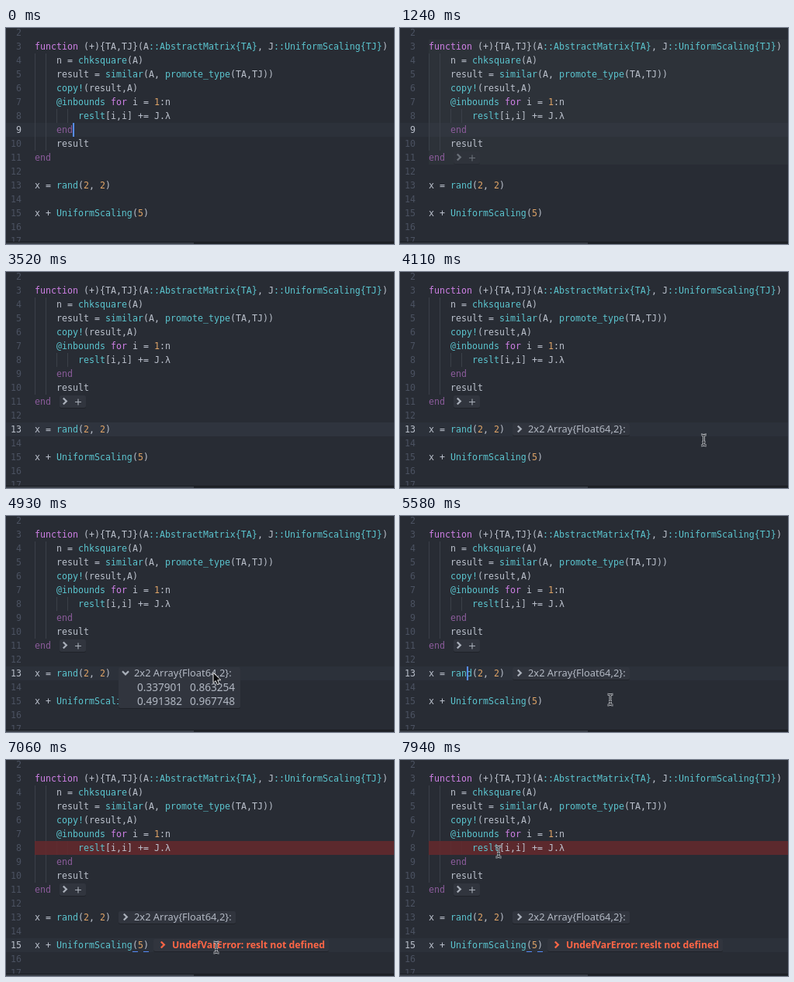
Recreate the animation shown at these times as an HTML page. Size 500 by 280 pixels, loop 8000 ms.

```html
<!DOCTYPE html>
<html lang="en">
<head>
<meta charset="utf-8">
<title>Inline evaluation</title>
<style>
html, body { margin: 0; width: 100%; height: 100%; overflow: hidden; background: #282c34; }
svg { display: block; width: 100vw; height: 100vh; }
text { white-space: pre; }
.code { font: 11.627px "DejaVu Sans Mono", monospace; fill: #bcc2cd; }
.ui { font: 12.87px "Noto Sans", sans-serif; fill: #b2b8c3; }
.row { font-size: 13.6px; }
.err { font-size: 12.28px; font-weight: 700; fill: #ff6646; }
</style>
</head>
<body>
<svg id="stage" viewBox="0 0 500 280"></svg>
<script>
(() => {
const LOOP = 8000, LEFT = 37, CHAR = 7, ROW = 18;
const COLORS = { k: '#cf80e6', e: '#8c5c9c', f: '#5bc5cf', n: '#dfa467' };
const stage = document.getElementById('stage');

function el(tag, attrs = {}, parent = stage, text) {
  const node = document.createElementNS('http://www.w3.org/2000/svg', tag);
  set(node, attrs);
  if (text !== undefined) node.textContent = text;
  parent.appendChild(node);
  return node;
}
function set(node, attrs) { for (const key in attrs) node.setAttribute(key, attrs[key]); }
const show = (node, on) => node.setAttribute('opacity', +on);
const rect = (x, y, width, height, fill, parent, more) =>
  el('rect', { x, y, width, height, fill, ...more }, parent);
const rowTop = line => ROW * line - 39;
const baseline = line => ROW * line - 26;
const clamp = v => Math.max(0, Math.min(1, v));
const ramp = (t, a, b) => clamp((t - a) / (b - a));
const smooth = v => v * v * (3 - 2 * v);
const within = (t, a, b) => t >= a && t < b;

// Markup: <kind:text> colours a token
const code = {
  3: '<k:function> (+){TA,TJ}(A<f:::AbstractMatrix{TA}>, J<f:::UniformScaling{TJ}>)',
  4: '    n = <f:chksquare>(A)',
  5: '    result = <f:similar>(A, <f:promote_type>(TA,TJ))',
  6: '    <f:copy!>(result,A)',
  7: '    <f:@inbounds> <k:for> i = <n:1>:n',
  8: '        <f:reslt>[i,i] += J.λ',
  9: '    <e:end>',
  10: '    result',
  11: '<e:end>',
  13: 'x = <f:rand>(<n:2>, <n:2>)',
  15: 'x + <f:UniformScaling>(<n:5>)'
};

function codeLine(line, markup) {
  let col = 0;
  for (const part of markup.split(/(<[a-z]:[^>]*>)/)) {
    const token = /^<([a-z]):(.*)>$/.exec(part);
    const raw = token ? token[2] : part;
    const body = raw.trimStart();
    const pad = raw.length - body.length;
    if (body) {
      const node = el('text', { class: 'code', x: LEFT + CHAR * (col + pad), y: baseline(line) }, stage, body);
      if (token) node.style.fill = COLORS[token[1]];
    }
    col += raw.length;
  }
}

function chevron(x, y, color, parent) {
  const g = el('g', { transform: `translate(${x} ${y})` }, parent);
  return el('path', {
    d: 'M-2.2-4L1.8 0L-2.2 4', fill: 'none', stroke: color, 'stroke-width': 2.3
  }, g);
}

function panel(x, y, w, h) {
  const g = el('g');
  const shadow = rect(x, y + 1, w, h, '#1c1f25', g, { rx: 2.5, opacity: .75 });
  const face = rect(x, y, w, h, '#31353e', g, { rx: 2.5 });
  return { g, resize(width, height) { for (const r of [shadow, face]) set(r, { width, height }); } };
}

// Backgrounds
rect(0, 0, 500, 280, '#282c34');
const activeRow = rect(0, 0, 500, ROW, '#2c313a');
const flash = rect(LEFT, 0, 463, ROW, '#c3cad8');
const stripes = el('pattern', {
  id: 'stripes', width: 20, height: 20, patternUnits: 'userSpaceOnUse',
  patternTransform: 'translate(0 249) skewX(-45)'
}, el('defs'));
rect(0, 0, 20, 20, '#2c3037', stripes);
rect(0, 0, 10, 20, '#363a41', stripes);
const loading = rect(LEFT, rowTop(15), 463, ROW, 'url(#stripes)');

for (let line = 4; line <= 10; line++)
  for (let i = 0; i < (line === 8 ? 4 : 2); i++)
    rect(LEFT + 14 * i, rowTop(line), 1, ROW, '#3b4049');
const errorRow = rect(LEFT, rowTop(8), 463, ROW, '#63292d', stage, { 'fill-opacity': .88 });

// Text and gutter
const numbers = {};
for (let line = 2; line <= 17; line++) {
  numbers[line] = el('text', { class: 'code', x: 20, y: baseline(line), 'text-anchor': 'end' }, stage, line);
  if (code[line]) codeLine(line, code[line]);
}
const brackets = el('g');
for (const col of [18, 20]) rect(LEFT + CHAR * col, 248, CHAR, 1, '#568cff', brackets);
const caret = rect(0, 0, 2, ROW, '#568cff');

// Results
const badge = panel(69, 160, 34, 16);
chevron(76, 167.5, '#a9afb9', badge.g);
el('path', { d: 'M89 168.5H97M93 164.5V172.5', stroke: '#a9afb9', 'stroke-width': 1.1 }, badge.g);

const failure = panel(190, 232, 226, 16);
chevron(202, 239.5, '#ff6646', failure.g);
el('text', { class: 'ui err', x: 214, y: 244 }, failure.g, 'UndefVarError: reslt not defined');

const matrix = panel(145, 196, 151, 16);
const matrixMark = chevron(154, 203.5, '#a9afb9', matrix.g);
el('text', { class: 'ui', x: 165, y: 208 }, matrix.g, '2x2 Array{Float64,2}:');
const cells = el('g', {}, matrix.g);
[['0.337901', '0.863254'], ['0.491382', '0.967748']].forEach((values, r) =>
  values.forEach((value, c) =>
    el('text', { class: 'ui row', x: 169 + 68 * c, y: 227 + ROW * r }, cells, value)));

// Bottom edge
rect(0, 277, 500, 3, '#20242a');
rect(0, 277, 500, 1, '#191c21');
rect(0, 278, 242, 2, '#3a3f48');

// Mouse pointers
const beam = el('g');
for (const [stroke, width] of [['#c9ccd1', 2.8], ['#25282e', 1.1]])
  el('path', {
    d: 'M-3.5-7Q0-7 0-5Q0-7 3.5-7M0-5V5M-3.5 7Q0 7 0 5Q0 7 3.5 7M-2 2.5H2',
    fill: 'none', stroke, 'stroke-width': width
  }, beam);
const arrow = el('g');
el('path', {
  d: 'M0 0V13.5L3.2 10.6L5.3 15.5L7.8 14.4L5.7 9.7H10Z', fill: '#08090b', stroke: '#e8e8e8', 'stroke-width': 1
}, arrow);

// Caret moves: time, line, column
const moves = [[0, 9, 7], [1660, 10, 7], [2440, 11, 3], [2620, 12, 0], [2800, 13, 7], [5820, 15, 21]];
// Spans in which the caret is lit
const blinks = [[0, 180], [530, 950], [1360, 2140], [2440, 3340], [3700, 4100], [4500, 4900],
  [5300, 5700], [5820, 6230], [6650, 7060], [7480, 7880]];
// Mouse path: time, x, y
const mouse = [[3700, 461, 227], [4110, 392, 218], [4290, 298, 209], [4480, 267, 203], [5250, 267, 203],
  [5580, 271, 238], [5720, 271, 244], [5800, 271, 243], [7480, 271, 243], [7560, 275, 246],
  [7940, 127, 119], [LOOP, 127, 119]];

function mouseAt(t) {
  const i = mouse.findIndex(p => p[0] > t);
  if (i < 1) return null;
  const [a, b] = [mouse[i - 1], mouse[i]];
  const k = ramp(t, a[0], b[0]);
  return [a[1] + (b[1] - a[1]) * k, a[2] + (b[2] - a[2]) * k];
}

function render(t) {
  const [, line, col] = moves.filter(m => m[0] <= t).pop();
  set(activeRow, { y: rowTop(line) });
  for (const n in numbers) numbers[n].style.fill = +n === line ? '#b9bfca' : '#4b5261';
  set(caret, { x: LEFT + CHAR * col, y: rowTop(line) });
  show(caret, blinks.some(([on, off]) => within(t, on, off)));
  show(brackets, line === 15);

  const block = t < 3000;
  const start = block ? 950 : 3520;
  set(flash, { y: rowTop(block ? 3 : 13), height: ROW * (block ? 9 : 1) });
  show(flash, .06 * ramp(t, start - 30, start + 60) * (1 - ramp(t, start + 180, start + 410)));

  show(badge.g, ramp(t, 1120, 1360));
  show(matrix.g, ramp(t, 3560, 3760));
  const open = smooth(ramp(t, 4640, 4820)) * (1 - smooth(ramp(t, 5110, 5270)));
  const height = 16 + 37 * open;
  matrix.resize(151 + 6 * open, height);
  set(matrixMark, { transform: `rotate(${90 * open})` });
  show(cells, ramp(open, .5, 1));

  show(errorRow, t >= 6530);
  show(loading, within(t, 6530, 6590));
  show(failure.g, t < 6590 ? 0 : ramp(t, 6560, 6760));

  const pos = mouseAt(t);
  const over = pos && within(pos[0], 145, 296) && within(pos[1], 196, 196 + height);
  show(beam, pos && !over);
  show(arrow, pos && over);
  if (pos) for (const p of [beam, arrow]) set(p, { transform: `translate(${pos[0]} ${pos[1]})` });
}

const began = performance.now();
function tick() {
  render((performance.now() - began) % LOOP);
  requestAnimationFrame(tick);
}
render(0);
requestAnimationFrame(tick);
})();
</script>
</body>
</html>
```
